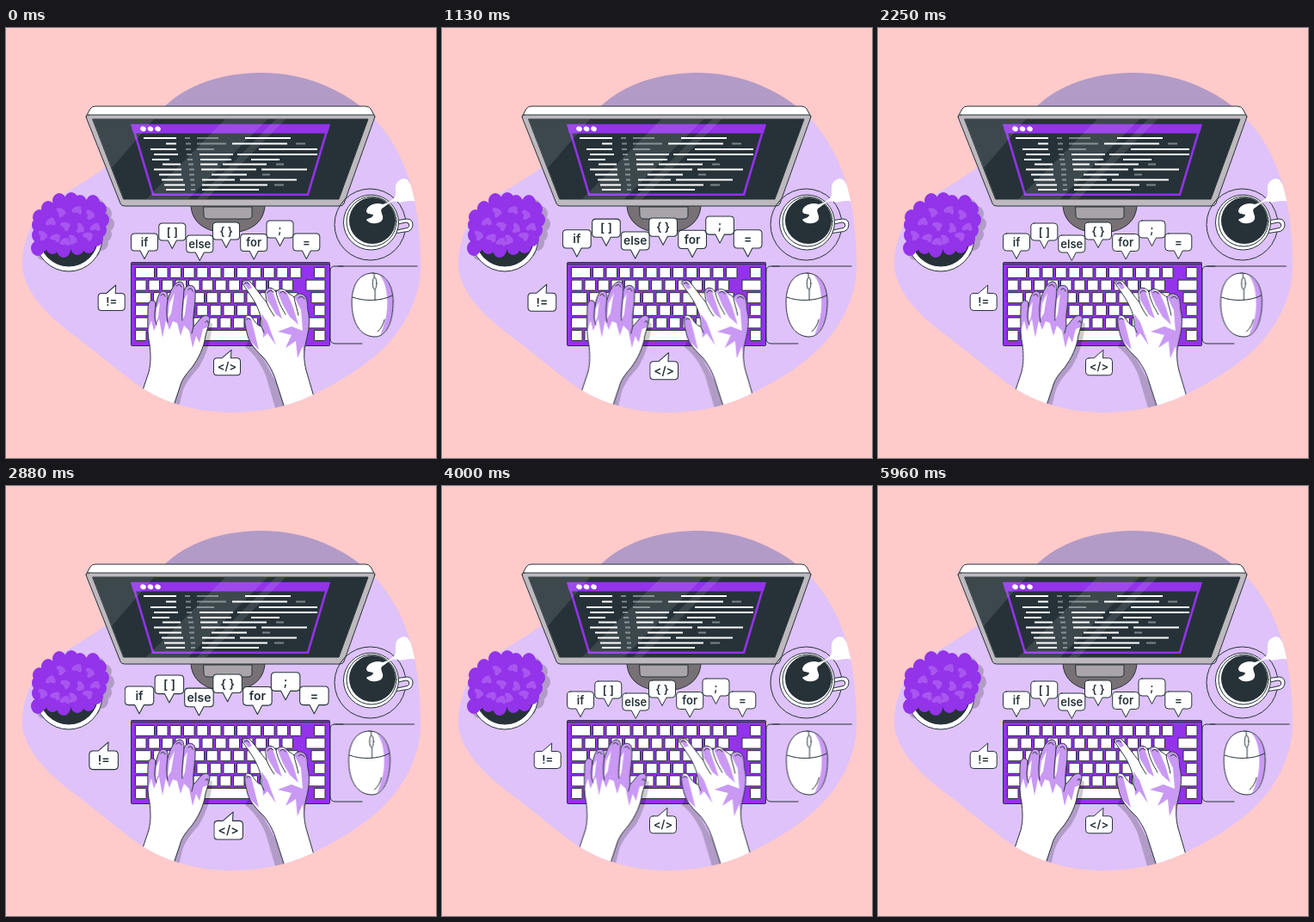
Animation of 500x500 px, one loop 6 s. Source, as an HTML page:

```html
<!DOCTYPE html>
<html lang="en">
<head>
<meta charset="utf-8">
<title>Coding desk</title>
<style>
  html, body { margin: 0; width: 100%; height: 100%; overflow: hidden; background: #ffcaca; }
  svg { display: block; width: 100vw; height: 100vh; }
  .ink { stroke: #263238; stroke-width: 1; stroke-linejoin: round; stroke-linecap: round; }
  .line { fill: none; }
  .white { fill: #fff; }
  .dark { fill: #263238; }
  .accent { fill: #9333ea; }
  .tint { fill: #c999f4; }
  .shade { fill: #000; opacity: .2; }
  #bubbles { transform-origin: 236px 314px; }
  text { font: 600 13px Inter, "Open Sans", sans-serif; fill: #263238; text-anchor: middle; }
</style>
</head>
<body>
<svg viewBox="0 0 500 500">
  <defs>
    <path id="blob" d="M300 52C352 53 395 74 424 101C452 129 468 165 475 200C480 225 482 252 482 280C481 315 463 350 435 376C411 398 382 414 356 427C326 441 296 447 263 447C224 447 187 437 159 419C134 402 102 374 76 355C47 333 21 306 19 277C19 250 28 221 54 202C78 185 110 170 130 149C151 127 168 104 188 88C217 62 258 52 300 52Z"/>
    <clipPath id="inBlob"><use href="#blob"/></clipPath>
    <path id="left" d="M156 430L166 400C169 388 168 378 167 368C164 355 165 340 165 328C165 320 167 316 171 317C174 317 174 321 174 324C176 312 179 305 184 306C188 307 188 311 188 316C191 306 196 295 202 295C207 295 207 301 207 305C209 300 213 298 217 300C221 302 220 308 220 316C219 328 217 336 218 347C221 345 224 339 228 336C232 333 237 334 237 339C236 345 234 350 232 358C230 372 224 384 216 395C208 404 204 410 202 418L193 445Z"/>
    <path id="right" d="M325 445L315 414C311 400 306 392 300 384C292 376 284 368 281 358C279 350 277 342 278 337C279 333 284 333 287 338C290 342 292 346 297 347C298 338 294 328 290 320C285 311 278 302 275 297C274 293 280 292 284 295C291 303 297 312 303 319C303 314 301 309 302 305C305 300 311 302 314 307C317 303 323 302 327 307C330 310 333 311 335 313C338 308 345 308 348 312C351 317 350 322 351 328C354 340 352 352 349 364C346 376 346 386 349 398L359 432Z"/>
    <clipPath id="inLeft"><use href="#left"/></clipPath>
    <clipPath id="inRight"><use href="#right"/></clipPath>
    <clipPath id="inScreen"><path id="glass" d="M101 106H421L387 199H137Z"/></clipPath>
  </defs>

  <use href="#blob" fill="#dec2f9"/>
  <path class="shade" clip-path="url(#inBlob)" d="M90 40H428V106H90Z"/>

  <!-- stand and monitor -->
  <path class="ink" fill="#777176" d="M215 205C215 226 232 238 258 238C284 238 301 226 301 205Z"/>
  <path class="ink" fill="#a8a4a9" d="M230 208H286V218Q286 222 281 222H235Q230 222 230 218Z"/>
  <path class="ink white" d="M93 103L98 94Q100 91 104 91H418Q422 91 424 94L429 103Z"/>
  <path class="ink" fill="#bdb9be" d="M96 101H426Q430 101 428 106L393 204Q392 207 388 207H138Q134 207 133 204L94 106Q92 101 96 101Z"/>
  <use href="#glass" class="ink dark"/>
  <path class="dark" d="M145 112H377L352 195H170Z"/>
  <path class="line" stroke="#9333ea" stroke-width="2.6" d="M147 113H375L351 193.7H171Z"/>
  <path class="accent" d="M145 112H377L374 122.500H148Z"/>
  <g id="dots" class="white"></g>
  <path class="line" stroke="#7c858a" stroke-width="1.8" d="M208 128H214M222 128H247M209 134.500H215M222 134.500H256M337 134.500H348M209 141H215M222 141H242M210 147H216M211 153H217M314 158.500H323M212 158.500H218M213 164.500H219M213 170.500H219M298 170.500H307M214 176.500H219M215 182.500H220M312 182.500H323M215 188H220"/>
  <path class="line" stroke="#fff" stroke-width="1.9" d="M160 128H198M278 128H331M186 134.500H198M263 134.500H327M168 141H198M294 141H362M172 147H200M225 147H264M269 147H362M170 153H190M226 153H262M285 153H318M182 158.500H203M226 158.500H246M252 158.500H303M172 164.500H204M227 164.500H291M297 164.500H350M178 170.500H204M239 170.500H280M181 176.500H206M228 176.500H266M272 176.500H338M184 182.500H208M228 182.500H304M186 188H208M228 188H294"/>
  <g clip-path="url(#inScreen)" fill="#fff" opacity=".11">
    <path d="M101 106H172L122 164Z"/>
    <path d="M255 106H304L212 199H163Z"/>
    <path d="M314 106H325L233 199H222Z"/>
  </g>

  <!-- plant -->
  <g id="plantShade" class="shade"></g>
  <circle class="ink white" cx="73" cy="244" r="39"/>
  <circle class="ink dark" cx="73" cy="243" r="34"/>
  <g id="leaves" class="accent"></g>
  <g id="lights" fill="#a956f0"></g>

  <!-- coffee -->
  <circle class="ink line" cx="423.500" cy="228.500" r="41.500"/>
  <path class="ink white" d="M452 224L466 222Q473 222 473 229Q472 237 464 237L451 239Z"/>
  <path class="ink" fill="#dec2f9" d="M456 228L465 226Q469 226 469 230Q468 233 464 233L455 235Z"/>
  <circle class="ink white" cx="424.500" cy="226" r="32"/>
  <circle class="ink line" cx="425" cy="225" r="29"/>
  <circle class="dark" cx="426" cy="224" r="27"/>
  <path class="white" clip-path="url(#inBlob)" d="M453 184C455 176 462 174 466 176C470 179 468 183 480 187V203C468 198 462 204 455 202C448 199 443 207 437 210C434 214 441 219 437 224C432 229 422 228 419 223C421 221 427 221 427 217C424 216 420 217 419 213C420 206 430 202 438 205C446 203 454 198 453 192Z"/>

  <!-- mouse and pad -->
  <path class="ink line" d="M392 277H382Q377 277 377 283V361Q377 367 383 367H414"/>
  <g id="mouse">
    <path class="ink line" d="M386 277H478"/>
    <path class="white" d="M426 285C441 285 450 299 450 318C450 342 442 359 429 359C412 359 402 343 402 319C402 298 411 285 426 285Z"/>
    <path class="tint" d="M434 287C444 292 450 303 450 318C450 338 444 352 435 357C441 343 444 330 443 314C442 302 440 294 434 287Z"/>
    <path class="ink line" d="M426 285C441 285 450 299 450 318C450 342 442 359 429 359C412 359 402 343 402 319C402 298 411 285 426 285ZM403 313C415 318 436 318 449 311M428 285V290M429 304V316M432 353Q438 348 440 339"/>
    <ellipse class="ink white" cx="428.500" cy="297" rx="2.300" ry="7"/>
  </g>

  <!-- keyboard -->
  <rect class="ink accent" x="145.500" y="272.500" width="231" height="97" rx="1"/>
  <path class="ink line" d="M146 274.500H376"/>
  <g id="keys" class="ink white"></g>

  <!-- hands -->
  <g clip-path="url(#inBlob)">
    <g id="hands">
      <path class="shade" d="M232 338L240 344C238 365 233 380 224 395C214 406 208 414 205 424L200 445H185Z"/>
      <path class="shade" d="M285 358L278 371C288 378 296 390 302 404L314 445H332Z"/>
      <use href="#left" class="white"/>
      <path class="tint" clip-path="url(#inLeft)" d="M160 290H240V346L229 350L225 366L221 358L217 372L213 352L207 346L203 358L199 343L194 341L190 351L186 340L182 360L178 338L172 352L169 340L164 356Z"/>
      <path class="white" clip-path="url(#inLeft)" d="M179 318L177 336L174 342L175 326ZM196 308L192 332L188 338L190 320ZM211 309L208 333L205 340L207 316Z"/>
      <use href="#left" class="ink line"/>
      <path class="ink line" d="M174 324C172 334 173 340 175 345M188 316C186 328 187 336 188 342M207 305C206 320 204 330 205 340M198 300Q202 296 204 301M212 304Q216 301 217 306M180 311Q183 307 185 312M232 342Q235 338 235 343M218 347L216 355"/>
      <use href="#right" class="white"/>
      <g class="tint" clip-path="url(#inRight)">
        <path d="M302 301L309 303L315 320L321 338L314 333L304 316ZM315 305L326 306L334 325L340 345L330 336L322 322ZM334 310H358V380L348 392L345 370L339 384L337 364L325 372L332 357L316 353L332 347L345 352L343 328Z"/>
        <path d="M276 334L285 338L288 350L294 374L282 362ZM297 332L304 342L314 369L304 355L299 360Z"/>
        <path d="M274 294H281L286 302L282 304Z"/>
      </g>
      <use href="#right" class="ink line"/>
      <path class="ink line" d="M303 319C306 326 309 331 312 335M314 307C316 318 321 326 325 333M335 313C336 320 339 328 340 334M277 298Q279 294 283 298M304 308Q307 303 311 307M319 308Q322 304 325 309M340 314Q344 310 347 315M280 339Q281 336 284 339M297 347L300 354"/>
    </g>
  </g>

  <g id="bubbles"></g>
</svg>
<script>
  const $ = id => document.getElementById(id);

  function add(parent, tag, attrs) {
    const el = document.createElementNS("http://www.w3.org/2000/svg", tag);
    for (const name in attrs) el.setAttribute(name, attrs[name]);
    return parent.appendChild(el);
  }

  for (const cx of [159.5, 168, 176.5])
    add($("dots"), "ellipse", { cx, cy: 117.3, rx: 3.4, ry: 2.8, transform: `rotate(25 ${cx} 117.3)` });

  // foliage: a core with rounded tufts along its rim
  function foliage(parent, dx, dy) {
    add(parent, "path", { d: tufts.map(([x, y], i) => (i ? "L" : "M") + (x + dx) + " " + (y + dy)).join("") + "Z" +
      tufts.map(([x, y]) => `M${x + dx - 8} ${y + dy}a8 9 0 1 1 16 0a8 9 0 1 1 -16 0`).join("") });
  }
  const tufts = [[62, 201], [76, 200], [86, 203], [101, 203], [109, 211], [112, 223], [109, 235],
    [105, 245], [96, 253], [83, 255], [67, 258], [54, 254], [40, 253], [37, 256], [38, 241],
    [38, 229], [39, 220], [49, 210]];
  foliage($("plantShade"), 6, 5);
  $("plantShade").firstChild.setAttribute("fill-rule", "nonzero");
  foliage($("leaves"), 0, 0);

  const spots = [[64, 213, 30], [82, 211, -25], [98, 216, 40], [51, 225, -40], [69, 229, 10], [87, 232, 60],
    [103, 231, -35], [43, 240, 35], [57, 243, -15], [78, 245, 45], [95, 241, 0], [68, 248, -30]];
  for (const [cx, cy, turn] of spots) {
    add($("lights"), "ellipse", { cx, cy, rx: 6, ry: 3.2, transform: `rotate(${turn} ${cx} ${cy})` });
    add($("lights"), "ellipse", { cx: cx + 2, cy: cy + 2, rx: 3, ry: 5, transform: `rotate(${turn} ${cx} ${cy})` });
  }

  // each row: widths of the first keys, then even keys up to the last one
  const rows = [[22, 12.5], [12.5, 22], [18, 16], [22, 12.5], [18, 24], [12.5, 12.5]];
  rows.forEach(([first, last], r) => {
    const y = 278.5 + r * 14.6;
    const key = (x, width) => add($("keys"), "rect", { x, y, width, height: 12, rx: .6 });
    const end = 371 - last;
    key(150.5, first);
    let x = 150.5 + first + 3;
    while (x + 12.5 < end - 1) {
      const isSpace = r === 5 && x > 205 && x < 225;
      const width = isSpace ? 74.5 : 12.5;
      key(x, width);
      x += width + 3;
    }
    key(end, last);
  });

  // label, centre of the box, side of the tail
  const labels = [["if", 161, 249, 1], ["[ ]", 193.3, 237, 1], ["else", 225.3, 251, 1],
    ["{ }", 256, 236, 1], ["for", 288.2, 249.5, 1], [";", 318.5, 234, 1], ["=", 349.3, 249, 1],
    ["!=", 122.7, 318.5, -1], ["</>", 257, 393.8, -1]];
  for (const [label, x, y, side] of labels) {
    const g = add($("bubbles"), "g", { transform: `translate(${x} ${y})` });
    const tail = side > 0
      ? ["", "H5L0 19.500L-5 10"]
      : ["H-6L5 -19.500L4.500 -10", ""];
    add(g, "path", { class: "ink white",
      d: `M-11.500 -10${tail[0]}H11.500Q15.500 -10 15.500 -6V6Q15.500 10 11.500 10${tail[1]}H-11.500Q-15.500 10 -15.500 6V-6Q-15.500 -10 -11.500 -10Z` });
    add(g, "text", { y: 4.5 }).textContent = label;
  }

  function play(id, steps, duration, options) {
    const frames = steps.map(([offset, transform]) => ({ offset, transform, easing: options.easing }));
    $(id).animate(frames, { duration, iterations: Infinity, delay: options.delay || 0 });
  }
  const shift = ([at, x]) => [at, `translateX(${x}px)`];

  play("bubbles", [[0, 1], [.1, 1.1], [.3, 1], [.4, 1], [.5, 1.1], [.6, 1], [1, 1]]
    .map(([at, s]) => [at, `scale(${s})`]), 6000, { easing: "linear" });

  play("hands", [[0, 0], [.1, -1], [.2, 2], [.3, -4], [.4, 4], [.5, -4], [.6, 4], [.7, -4], [.8, 2], [.9, -1], [1, 0]]
    .map(shift), 3000, { easing: "ease" });

  play("mouse", [[0, .4], [.5, -3.6], [1, .4]].map(shift), 6000, { easing: "ease-in-out", delay: -500 });
</script>
</body>
</html>
```
